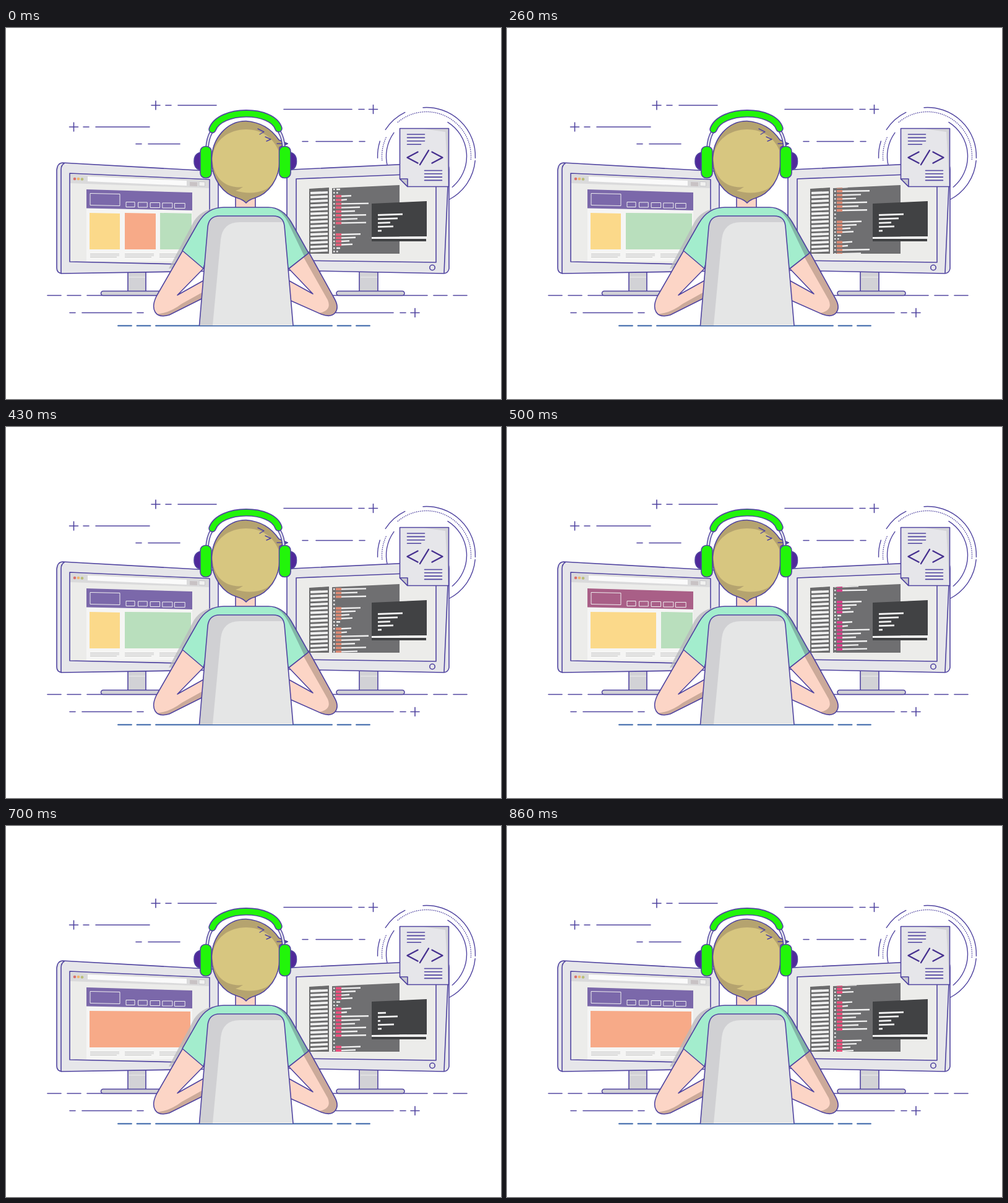
Recreate the animation shown at these times as an HTML page. Size 800x600 px, loop 900 ms.

```html
<!DOCTYPE html>
<html lang="en">
<head>
<meta charset="utf-8">
<title>Developer at work</title>
<style>
html, body { margin: 0; width: 100%; height: 100%; overflow: hidden; background: #fff; }
svg { display: block; width: 800px; height: 600px; }
.ink { stroke: #5044a0; stroke-width: 1.6; stroke-linejoin: round; stroke-linecap: round; }
.thin { stroke-width: 1.4; }
.line { fill: none; }
.bezel { fill: #e6e6ea; }
.skin { fill: #fcd5c6; }
.skinShade { fill: #cbaa9a; }
.green { fill: #22f50a; }
.metal { fill: #d2d2d6; }
.white { stroke: #f0f0f0; fill: none; }
</style>
</head>
<body>
<svg viewBox="0 0 800 600">
  <defs>
    <clipPath id="codeClip"><path d="M527 259L636 254V365H527Z"/></clipPath>
    <clipPath id="armsClip">
      <path d="M285 361L243 434C233 455 241 471 264 464L320 436V408L277 432L320 388Z"/>
      <path d="M489 362L531 438C541 456 531 471 510 463L458 440V409L496 430L456 388Z"/>
    </clipPath>
    <clipPath id="shirtClip"><path id="shirt" d="M285 360L310 316Q325 290 352 290H424Q447 290 461 314L489 364L456 390L440 310H340L319 389Z"/></clipPath>
  </defs>

  <g id="dashes" class="ink line"></g>
  <g id="rings" class="ink thin line"></g>

  <!-- left monitor -->
  <g class="ink">
    <path class="metal" d="M197 394H226V427H197Z"/>
    <rect class="metal" x="153.500" y="425.500" width="110" height="7" rx="3.500"/>
    <path class="bezel" d="M92 218L335 231.500Q343 233 343 242V393L90 397Q82 396 82 388V230Q83 218 92 218Z"/>
    <path class="line" d="M94 219Q89 222 89 229V397"/>
    <path fill="#ececea" d="M103 235L329 245V383L103 378Z"/>
  </g>
  <path d="M199 403H225" stroke="#eee"/>
  <path fill="#dadadb" d="M104 236.500L328 246V259L104 251Z"/>
  <path fill="#fafafa" d="M132 240L292 247V255L132 248Z"/>
  <path fill="#c8c2c4" d="M297 249L309 249.500V256L297 255.500Z"/>
  <path fill="#f1f1f0" stroke="#c9c9cc" d="M312 248.500L321.500 249V256L312 255.500Z"/>
  <g><circle cx="111" cy="244" r="2.300" fill="#d9706c"/><circle cx="117" cy="244" r="2.300" fill="#efb66e"/><circle cx="123" cy="244.500" r="2.300" fill="#b9bd78"/></g>
  <path fill="#f5f5f4" d="M130 261L301 266V377H130Z"/>
  <path id="banner" d="M130 261L301 266V295L130 291.500Z"/>
  <path id="nav" class="white"/>
  <g id="tiles"></g>
  <path id="captions" stroke="#c4c4c4"/>

  <!-- right monitor -->
  <g class="ink">
    <path class="metal" d="M571 394H601V427H571Z"/>
    <rect class="metal" x="534" y="425.500" width="110" height="7" rx="3.500"/>
    <path class="bezel" d="M454 237Q454 230 462 229L706 217.500Q716 218 716 229V389Q715 396 708 397L454 392Z"/>
    <path class="line" d="M714 257L708 396"/>
    <path fill="#ececea" d="M469 244L695 235V379L469 376Z"/>
    <circle class="bezel" cx="689" cy="387.500" r="4.200"/>
  </g>
  <path d="M573 403H600" stroke="#eee"/>
  <path fill="#6b6b6c" d="M490 260L522 258V365H490Z"/>
  <path id="side" class="white" stroke-width="3.800"/>
  <path fill="#6f6f71" d="M527 259L636 254V365H527Z"/>
  <g clip-path="url(#codeClip)"><g id="code"></g></g>
  <path fill="#414244" d="M591 284L680 280V337L591 338Z"/>
  <path fill="#f5f5f5" d="M591 338L680 337V341.500H591Z"/>
  <path fill="#414244" d="M591 341H679V345H591Z"/>
  <path id="term" class="white" stroke-width="2.800"/>

  <!-- document -->
  <path class="bezel" d="M636.500 162.500H715.500V256.500H649L636.500 244Z"/>
  <path fill="#d3d3d7" d="M674 163H715V256L710 168Z"/>
  <g class="ink">
    <path class="line" d="M636.500 162.500H715.500V256.500H649L636.500 244Z"/>
    <path fill="#c9c9d0" d="M636.500 244H649V256.500Z"/>
    <path id="docText" class="line"/>
    <path class="line" style="stroke:#46308f;stroke-width:2.400" d="M665.500 200.500L648.500 209.500L665.500 218.500M683 198L669 221M688.500 200.500L705.500 209.500L688.500 218.500"/>
  </g>

  <!-- person -->
  <path fill="#b9b9bd" opacity=".75" d="M340 291Q316 294 304 312L263 389H271L285 361L312 316Q323 294 340 291Z"/>
  <path class="skin ink" d="M371 274H403V293H371Z"/>
  <g clip-path="url(#armsClip)">
    <path class="skin" d="M230 350H545V475H230Z"/>
    <path class="skinShade" d="M238 463Q262 463 284 446L320 426V445L262 470H240Z"/>
    <path class="skinShade" d="M477 364L520 440Q527 457 506 461L515 472H545V440L490 360Z"/>
  </g>
  <g class="ink line">
    <path d="M285 361L243 434C233 455 241 471 264 464L320 436M320 408L277 432L320 388"/>
    <path d="M489 362L531 438C541 456 531 471 510 463L458 440M458 409L496 430L456 388"/>
  </g>
  <use href="#shirt" fill="#a3edcd"/>
  <path clip-path="url(#shirtClip)" fill="#82b5a6" d="M424 288Q446 294 456 315L482 369H495V350L462 300Z"/>
  <use href="#shirt" class="ink" fill="none"/>
  <path fill="#d0d0d3" d="M312.500 481L326 322Q328 304 345 304H432Q448 304 450 320L464 481Z"/>
  <path fill="#e5e6e6" d="M334 481L347 342Q350 314 378 314H449L464 481Z"/>
  <path class="ink line" d="M312.500 481L326 322Q328 304 345 304H432Q448 304 450 320L464 481"/>

  <!-- head and headphones -->
  <path class="ink" fill="#b5a36f" d="M441 181L455 187L442 193V213A55 62.500 0 0 1 402 275Q392 278 388 283Q384 278 374 275A55 62.500 0 0 1 332.500 213A55 62.500 0 0 1 388 150.500Q422 153 441 181Z"/>
  <path fill="#d7c680" d="M333.500 211C336 180 361 164 388 164C415 164 434 180 441 200C443 226 438 249 420 261C405 268 386 268 371 263Q378 261 383 257C358 260 335 246 333.500 211Z"/>
  <path class="ink line thin" d="M407 163L417 168L410 172M419 176L428 180L421 183M438 187L455 187L444 192"/>
  <g class="line" stroke-linecap="round">
    <path stroke="#5044a0" stroke-width="5.500" d="M332 168Q326 178 325 194M442 168Q448 178 449 194"/>
    <path stroke="#e4e4ec" stroke-width="2.600" d="M332 168Q326 178 325 194M442 168Q448 178 449 194"/>
    <path stroke="#5044a0" stroke-width="12.500" d="M333.500 164C346 130 430 130 440.500 162.500"/>
    <path stroke="#22f50a" stroke-width="9.200" d="M333.500 164C346 130 430 130 440.500 162.500"/>
  </g>
  <g class="ink">
    <path fill="#50299a" d="M315 201Q304 203 304 215.500T315 230ZM459 201Q469.500 203 469.500 215.500T459 230Z"/>
    <rect class="green" x="314" y="191.500" width="18" height="51" rx="8"/>
    <rect class="green" x="441.500" y="191.500" width="18.500" height="51" rx="8"/>
  </g>
</svg>
<script>
const LOOP = 900, STEP = 100;
const $ = id => document.getElementById(id);
const draw = (id, d) => $(id).setAttribute('d', d);
const bar = (x, y, w) => `M${x} ${y}h${w}`;
const path = (d, attrs = '') => `<path d="${d}" ${attrs}/>`;
const repeat = (n, fn) => Array.from({ length: n }, (_, i) => fn(i)).join('');

// Background: a long stroke trailed by a short one, and strokes with mirrored dashes.
const plus = (x, y) => `M${x - 7} ${y}h14m-7 -7v14`;
const trail = (x, y, long, dir = 1) => bar(x, y, dir * 9) + bar(x + dir * 20, y, dir * long);
function ground(y, from, to, dash, gap) {
  const pitch = dash + gap;
  return bar(from, y, to - from) +
    repeat(2, i => bar(from - pitch * (i + 1), y, dash) + bar(to + gap + pitch * i, y, dash));
}
$('dashes').innerHTML = path(
  plus(242, 125) + trail(258, 125, 62) +
  plus(109.5, 160) + trail(125, 160, 87) +
  trail(210, 187.5, 51) +
  plus(593.5, 131.5) + trail(579, 131.5, 110, -1) +
  trail(580, 183.5, 59, -1) + bar(479, 183.5, 9) +
  trail(103, 460.5, 80) + bar(212, 460.5, 10) +
  plus(661, 460.5) + trail(646, 460.5, 93, -1) +
  ground(432.5, 131, 681, 22, 10)) +
  path(ground(481.5, 242, 527, 22, 8.5), 'style="stroke:#3460a6;stroke-width:1.8"');

function arc(r, from, to, attrs) {
  const at = deg => {
    const a = deg * Math.PI / 180;
    return `${679.5 + r * Math.cos(a)} ${207.5 + r * Math.sin(a)}`;
  };
  return path(`M${at(from)}A${r} ${r} 0 ${to - from > 180 ? 1 : 0} 1 ${at(to)}`, attrs);
}
const dotted = 'stroke-dasharray="0.5 2.6"';
$('rings').innerHTML =
  arc(79, -94, 2) + arc(79, 5, 62) + arc(79, 178, 198) + arc(79, 213, 244) +
  arc(72, -130, 5, dotted) + arc(72, 175, 205, dotted) +
  arc(65, -58, 50) + arc(65, 165, 216);

draw('nav', 'M136 267.5L184 268.500V287.500L136 286.500Z' + repeat(5, i => {
  const w = 14 + i * .7;
  return `M${194 + i * 19.6} ${281.5 + i * .5}h${w}v8h${-w}Z`;
}));
draw('captions', repeat(9, i => bar(136 + 56 * (i % 3), 365.5 + 2.5 * Math.floor(i / 3), i > 5 ? 43 : 47)));
draw('side', repeat(15, i => `M492 ${267 + i * 6.7}l28 -1.2`));
draw('docText', repeat(4, i => bar(648.5, 172 + i * 5.4, i < 3 ? 28 : 22) + bar(676.5, 230.5 + i * 5.3, 28)));

// Code: one block of lines repeated; the gaps show only gutter marks.
const lengths = [16, 9, 44, 30, 22, 40, 26, 40, 0, 0, 31, 23, 13, 18];
const PERIOD = 95;
let gutter = '', labels = '', text = '';
for (let n = -1; n < 3; n++) {
  for (let i = 0; i < 16; i++) {
    const y = 272 + n * PERIOD + 6.2 * Math.min(i, 10) + 5.5 * Math.max(0, i - 10);
    gutter += bar(529, y, 2.5);
    if (lengths[i]) {
      labels += bar(533, y, 9);
      text += `M542 ${y}l${lengths[i]} -.8`;
    } else if (i > 13) text += bar(534, y, i < 15 ? 6 : 2.5);
  }
}
$('code').innerHTML = path(gutter + text, 'class="white" stroke-width="2.4"') +
  path(labels, 'id="labels" fill="none" stroke-width="4"');

const fills = { y: '#fbd98a', o: '#f7aa88', g: '#b9dfbd' };
const scenes = [
  { banner: '#7b68aa', tiles: 'yog', tint: '#e4607a' },
  { banner: '#7b68aa', tiles: 'ygg', tint: '#dc8a74' },
  { banner: '#a95f87', tiles: 'yyg', tint: '#d8408a' },
  { banner: '#7b68aa', tiles: 'ooo', tint: '#ea4f7c' }
];
const prints = { a: [40, 32, 20, 25, 6], b: [40, 12, 20, 6, 6], c: [13, 32, 4, 26, 6] };
const printOrder = 'aaabaacca';

// Neighbouring columns of one colour merge into a single tile.
function tiles(row) {
  const left = i => 135 + 57 * i;
  return row.match(/(.)\1*/g).map(run => {
    const from = row.indexOf(run[0]), x = left(from);
    const end = left(from + run.length) - 8 + from;
    return path(`M${x} 299L${end} 300V358H${x}Z`, `fill="${fills[run[0]]}"`);
  }).join('');
}

let shown;
function show(scene) {
  if (scene === shown) return;
  shown = scene;
  $('banner').setAttribute('fill', scene.banner);
  $('labels').setAttribute('stroke', scene.tint);
  $('tiles').innerHTML = tiles(scene.tiles);
}

function frame() {
  const t = performance.now() % LOOP;
  const step = Math.floor(t / STEP);
  show(scenes[Math.floor(t / LOOP * scenes.length)]);
  $('code').setAttribute('transform', `translate(0 ${-10.2 * step})`);
  draw('term', prints[printOrder[step]].map((w, i) => `M601 ${302.5 + i * 6.4}l${w} ${-w / 30}`).join(''));
  requestAnimationFrame(frame);
}
frame();
</script>
</body>
</html>
```
